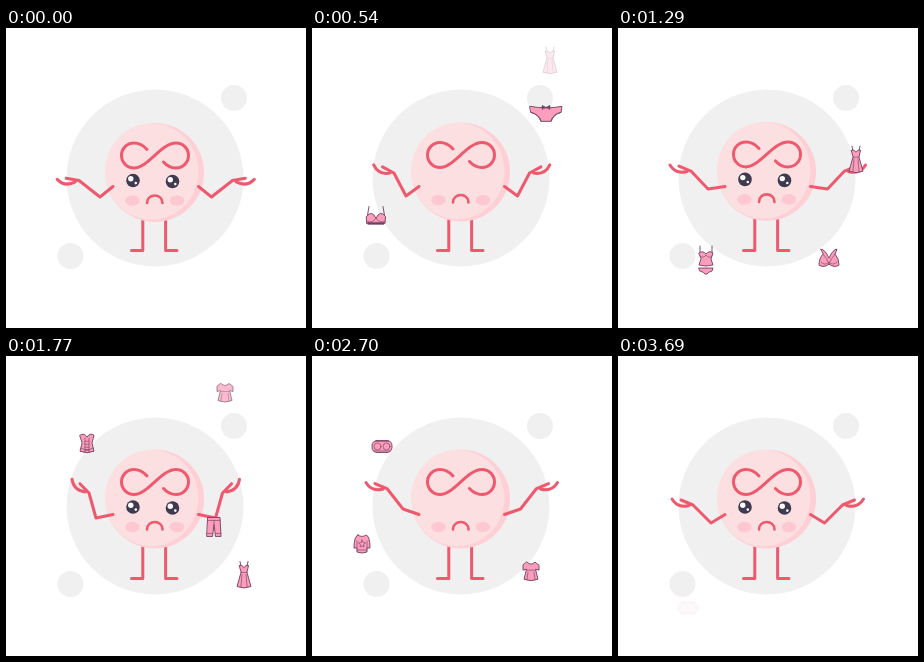
Animation of 300 by 300 pixels, one loop 3750 ms. Source, as an HTML page:

```html
<!DOCTYPE html>
<html lang="en">
<head>
<meta charset="utf-8">
<title>Falling clothes</title>
<style>
  html, body { margin: 0; width: 100%; height: 100%; overflow: hidden; background: #fff; }
  svg { display: block; width: 100%; height: 100%; }
  .line { fill: none; stroke: #ef596e; stroke-width: 3; stroke-linecap: round; stroke-linejoin: round; }
  .item { fill: #fb9dbb; stroke: #70405f; stroke-width: .9; stroke-linejoin: round; stroke-linecap: round; }
  .item .open { fill: none; }
  .item .fine { fill: none; stroke-width: .6; }
  .item .dark { fill: #70405f; stroke-width: .4; }
</style>
</head>
<body>
<svg viewBox="0 0 300 300">
  <g fill="#f0f0f0">
    <circle cx="149" cy="150" r="88.5"/>
    <circle cx="228" cy="70" r="13"/>
    <circle cx="64.5" cy="228" r="13"/>
  </g>
  <path class="line" d="M136.8 190V222.5H125.5M159.6 190V222.5H171"/>
  <g id="head">
    <circle cx="148.7" cy="144" r="49.4" fill="#fed0d6"/>
    <ellipse cx="145.7" cy="143" rx="46.6" ry="48.2" fill="#fce0e1"/>
    <g fill="#fec8d0">
      <ellipse cx="126.5" cy="172" rx="7.3" ry="5.3"/>
      <ellipse cx="171" cy="172" rx="7.3" ry="5.3"/>
    </g>
    <path class="line" d="M141 121C137 116.500 133 114.500 128 114.500A12.500 12.500 0 0 0 128 139.500C142 139.500 155 114.500 170 114.500A12.500 12.500 0 0 1 170 139.500C165 139.500 161 137.500 157.500 133.500"/>
    <path class="line" style="stroke-width:2.600" d="M141 174.500C141 164.500 156.500 164.500 156.500 174.500"/>
    <g id="eyes"></g>
  </g>
  <path id="armL" class="line"/>
  <path id="armR" class="line"/>
  <g id="items"></g>
</svg>
<script>
const LOOP = 3750;
const $ = id => document.getElementById(id);
const shape = (d, cls = '') => `<path class="${cls}" d="${d}"/>`;

const art = {
  bra: shape('M-9 3L-7 -9M9 3L7 -9', 'open') +
    shape('M-9.500 1Q-4 -6 0 3Q4 -6 9.500 1L9 8H-9Z') +
    shape('M-9 6Q-4 8 0 3Q4 8 9 6', 'fine') + shape('M-8 7H8V9H-8Z', 'dark'),
  panty: shape('M-16 -7Q0 -4 16 -7L15 -1Q7 1 5 8H-5Q-7 1 -15 -1Z') +
    shape('M-15 -1Q-7 1 -5 8M15 -1Q7 1 5 8', 'open') +
    shape('M0 -6L-4 -8V-4ZL4 -8V-4Z', 'dark'),
  dress: shape('M-4 -13L-3 -8M4 -13L3 -8', 'open') +
    shape('M-4.500 -9Q-2 -10 0 -7Q2 -10 4.500 -9L3 -2L7 12Q0 15 -7 12L-3 -2Z') +
    shape('M-3 -2H3M-2 0L-3 12M2 0L3 12', 'fine'),
  bikini: shape('M-6 -8V-15M6 -8V-15', 'open') +
    shape('M-7 -8Q-3 -11 0 -7Q3 -11 7 -8L5 -2L7 4Q0 6 -7 4L-5 -2Z') +
    shape('M-6 -5Q-3 -2 0 -6Q3 -2 6 -5', 'fine') +
    shape('M-7 7H7L6 10Q2 11 1 13H-1Q-2 11 -6 10Z'),
  sport: shape('M-8 -9Q-4 -9 0 0Q4 -9 8 -9L6 -4Q10 0 10 7Q5 10 0 6Q-5 10 -10 7Q-10 0 -6 -4Z') +
    shape('M-6 -4Q-2 0 0 6M6 -4Q2 0 0 6M-8 4Q-4 8 0 4Q4 8 8 4', 'fine'),
  corset: shape('M-7 -8Q-3 -11 0 -6Q3 -11 7 -8L5 0L7 8Q0 11 -7 8L-5 0Z') +
    shape('M-2 -5V9M2 -5V9M-2 -2H2M-2 1H2M-2 4H2M-2 7H2M-6 5Q0 8 6 5', 'fine'),
  trousers: shape('M-6 -10H6L7 9H1.500L0 -3L-1.500 9H-7Z') +
    shape('M-6 -7H6M-7 6H-2M7 6H2M0 -7V-3', 'fine'),
  sweater: shape('M-4 -9Q0 -6 4 -9Q8 -8 8 4H5V8Q0 10 -5 8V4H-8Q-8 -8 -4 -9Z') +
    shape('M-5 -3V4M5 -3V4M-5 6H5', 'fine') +
    shape('M0 -4L1 -1.500L3.500 -1L1.500 .6L2 3L0 1.800L-2 3L-1.500 .6L-3.500 -1L-1 -1.500Z', 'fine'),
  tee: shape('M-4 -9Q0 -5 4 -9L8 -6V-1L4.500 -2L7 8Q0 11 -7 8L-4.500 -2L-8 -1V-6Z') +
    shape('M-4 -1H4M-3 1L-4 8M3 1L4 8', 'fine'),
  band: '<rect x="-10" y="-6" width="20" height="12" rx="5"/>' +
    '<circle class="fine" cx="-4.500" cy="0" r="3.500"/><circle class="fine" cx="4.500" cy="0" r="3.500"/>' +
    shape('M-7 -5H7M-8 4.500H8', 'fine')
};

// name, x, first y, last y, start, duration, final opacity
const drops = [
  ['bra', 64, 14, 252, 20, 800, 0],
  ['panty', 234, 13, 253, 134, 1100, 0],
  ['bikini', 88, 33, 257, 582, 900, 0],
  ['sport', 211, 28, 252, 573, 900, 0],
  ['dress', 238, 32, 244, 511, 1627, 0],
  ['corset', 81, 37, 257, 1412, 1132, 0],
  ['trousers', 208, 37, 262, 1321, 800, 0],
  ['sweater', 50, 37, 235, 1862, 1241, 0],
  ['tee', 219, 35, 235, 1701, 1256, 0],
  ['band', 70, 15, 252, 2220, 1260, .05]
];

// time, elbow x, elbow y, wrist x, wrist y, hand turn, head shift
const poses = [
  [0, 94, 169, 73, 152.5, -13, .5],
  [365, 92, 165, 84, 137, 22, 0],
  [540, 94, 168, 82, 145, 6, 0],
  [730, 93, 167, 70, 150, -8, 0],
  [1095, 90, 162, 84, 136, 24, -.6],
  [1290, 90, 161, 73, 143, 0, -.6],
  [1460, 91, 164, 69.5, 149.5, -6, -.6],
  [1770, 90, 162, 83, 137, 23, -1],
  [2190, 91, 164, 71, 149.5, -6, -1],
  [2540, 90, 155, 82, 130, 18, -1],
  [2700, 91, 153, 75, 132.5, 0, -1],
  [2920, 92, 161, 72, 147, -6, -1],
  [3240, 93, 167, 75, 149, 0, -1],
  [LOOP, 93, 167, 75, 149, 0, -1]
];
const blinks = [540, 2700];

const clamp = v => Math.max(0, Math.min(1, v));
const ease = u => (1 - Math.cos(Math.PI * u)) / 2;

function slope(i, k) {
  const a = poses[i - 1], b = poses[i], c = poses[i + 1];
  if (!a || !c || (b[k] - a[k]) * (c[k] - b[k]) <= 0) return 0;
  return (c[k] - a[k]) / (c[0] - a[0]);
}

// Hermite curve through the poses
function poseAt(t) {
  const i = poses.findIndex((p, n) => n === poses.length - 2 || t < poses[n + 1][0]);
  const a = poses[i], b = poses[i + 1], h = b[0] - a[0], u = (t - a[0]) / h;
  const s = u * u * (3 - 2 * u);
  return a.slice(1).map((v, n) => v + (b[n + 1] - v) * s +
    h * u * (1 - u) * ((1 - u) * slope(i, n + 1) - u * slope(i, n + 1 + 0 * u + 0) * 0 - u * slope(i + 1, n + 1)));
}

function armPath([ex, ey, wx, wy, turn], mirror) {
  const r = turn * Math.PI / 180, c = Math.cos(r), s = Math.sin(r);
  const at = (x, y) => `${(mirror ? 299.5 - x : x).toFixed(2)} ${y.toFixed(2)}`;
  const hand = (x, y) => at(wx + x * c - y * s, wy + x * s + y * c);
  return `M${at(107, 158.5)}L${at(ex, ey)}L${at(wx, wy)}L${hand(-12, -5)}` +
    `M${hand(-21, -6)}C${hand(-18, -1)} ${hand(-13, 3)} ${hand(-4, .5)}`;
}

const eye = (x, y) => `<g data-x="${x}" data-y="${y}"><circle r="6.800" fill="#3f3a50"/>
  <circle cx="-2.200" cy="-1.800" r="2.700" fill="#fff"/><circle cx="2.800" cy="2.600" r="1.300" fill="#fff"/></g>`;
$('eyes').innerHTML = eye(127, 152) + eye(166.500, 153);
$('items').innerHTML = drops.map(d => `<g class="item">${art[d[0]]}</g>`).join('');
const eyes = [...$('eyes').children], items = [...$('items').children];

function draw(t) {
  const pose = poseAt(t);
  $('armL').setAttribute('d', armPath(pose, false));
  $('armR').setAttribute('d', armPath(pose, true));
  $('head').setAttribute('transform', `translate(0 ${pose[5].toFixed(2)})`);

  const away = Math.min(...blinks.map(b => Math.abs(t - b)));
  const lid = clamp((away - 30) / 70);
  for (const e of eyes) {
    e.setAttribute('transform', `translate(${e.dataset.x} ${e.dataset.y}) scale(1 ${lid})`);
    e.style.display = lid ? '' : 'none';
  }

  drops.forEach(([, x, y0, y1, start, span, rest], i) => {
    const u = (t - start) / span;
    const fade = u < 0 ? 0 : Math.max(rest, clamp(u / .08) * clamp((1 - u) / .08));
    items[i].setAttribute('transform', `translate(${x} ${(y0 + (y1 - y0) * ease(clamp(u))).toFixed(2)})`);
    items[i].setAttribute('opacity', fade);
  });
}

const began = performance.now();
function tick() {
  draw((performance.now() - began) % LOOP);
  requestAnimationFrame(tick);
}
tick();
</script>
</body>
</html>
```
